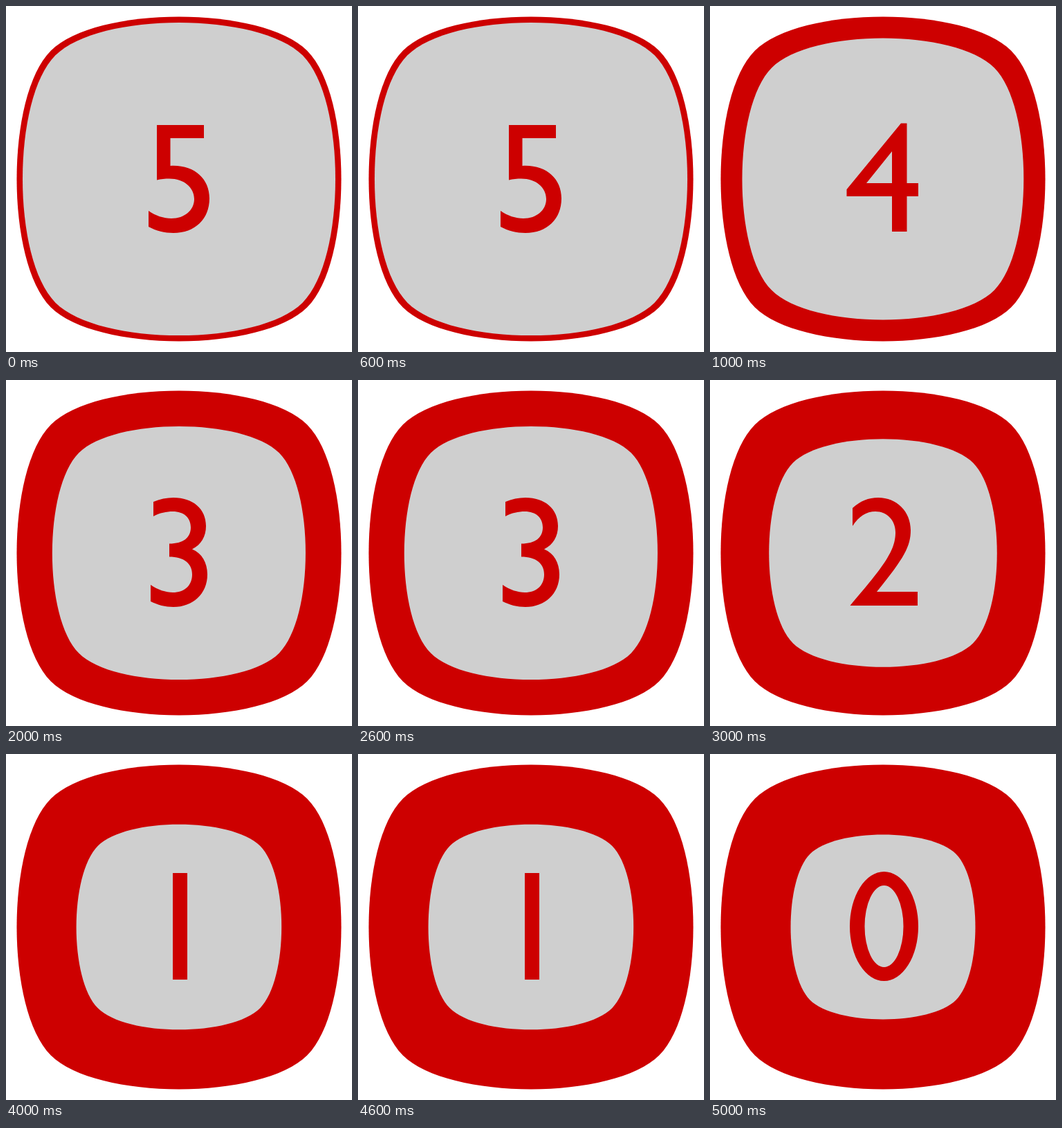
An HTML page with a canvas that plays this animation: 500 px wide and 500 px high, repeating every 6 s.

```html
<!DOCTYPE html>
<html lang="en">
<head>
<meta charset="utf-8">
<title>Countdown</title>
<style>
html, body { margin: 0; width: 100%; height: 100%; overflow: hidden; background: #fff; }
canvas { display: block; width: 500px; height: 500px; }
</style>
</head>
<body>
<canvas id="stage" width="500" height="500" role="img" aria-label="Countdown from 5 to 0"></canvas>
<script>
const ctx = document.getElementById("stage").getContext("2d");
const RED = "#cd0000";
const GRAY = "#cfcfcf";
const STEP = 1000;
const OUTER = 234.5;
const FIRST_INNER = 226;
const SHRINK = 0.9;
const ROUNDING = 0.25; // handle length relative to the side of the square

// Numerals in the order they are shown, 5 down to 0
const digits = [
  "M218 172H286V191H237.5V231C271 229 294 249 294 278C294 308 273 328 242 328C229 328 217 325 206 319V296C216 303 228 307 239 307C258 307 272 295 272 279C272 262 257 249.5 236 249.5C230 249.5 224 250 218 251.5Z",
  "M276 169.5H284.5V256H301V275H284.5V326H263V275H197.5V265ZM263 210V256H226Z",
  "M213 176C222 172 232 170 242 170C270 170 289 186 289 211C289 226 282 238 269 244.5C283 250 291 264 291 281C291 309 270 328 242 328C230 328 219 325 209 320V296C219 303 231 307 241 307C258 307 269 297 269 281C269 265 257 255.5 236 255.5V236.5C256 236.5 267 228 267 213C267 199 257 190 241 190C232 190 222 192 213 197Z",
  "M206 185C217 175 229 170 243 170C270 170 290 190 290 217C290 240 281 257 241 306H300V326H202.5C253 267 268 246 268 220C268 203 256 190 239 190C226 190 215 197 206 211Z",
  "M241 172H262V326H241Z",
  "M202 249A49.5 79 0 0 1 301 249A49.5 79 0 0 1 202 249ZM223.5 249A28 59 0 0 1 279.5 249A28 59 0 0 1 223.5 249Z"
].map(d => new Path2D(d));

// Square with one bulging curve per side and corners smooth along the diagonals
function squircle(r, color) {
  const handle = ROUNDING * Math.SQRT2;
  const c = r / (1 + 0.75 * handle);
  const m = c * handle;
  ctx.save();
  ctx.translate(250, 250);
  ctx.beginPath();
  ctx.moveTo(-c, -c);
  for (let side = 0; side < 4; side++) {
    ctx.bezierCurveTo(m - c, -c - m, c - m, -c - m, c, -c);
    ctx.rotate(Math.PI / 2);
  }
  ctx.fillStyle = color;
  ctx.fill();
  ctx.restore();
}

function draw(time) {
  const step = Math.floor(time / STEP) % digits.length;
  ctx.fillStyle = "#fff";
  ctx.fillRect(0, 0, 500, 500);
  squircle(OUTER, RED);
  squircle(FIRST_INNER * SHRINK ** step, GRAY);
  ctx.fillStyle = RED;
  ctx.fill(digits[step], "evenodd");
}

const start = performance.now();
function tick() {
  draw(performance.now() - start);
  requestAnimationFrame(tick);
}
tick();
</script>
</body>
</html>
```
